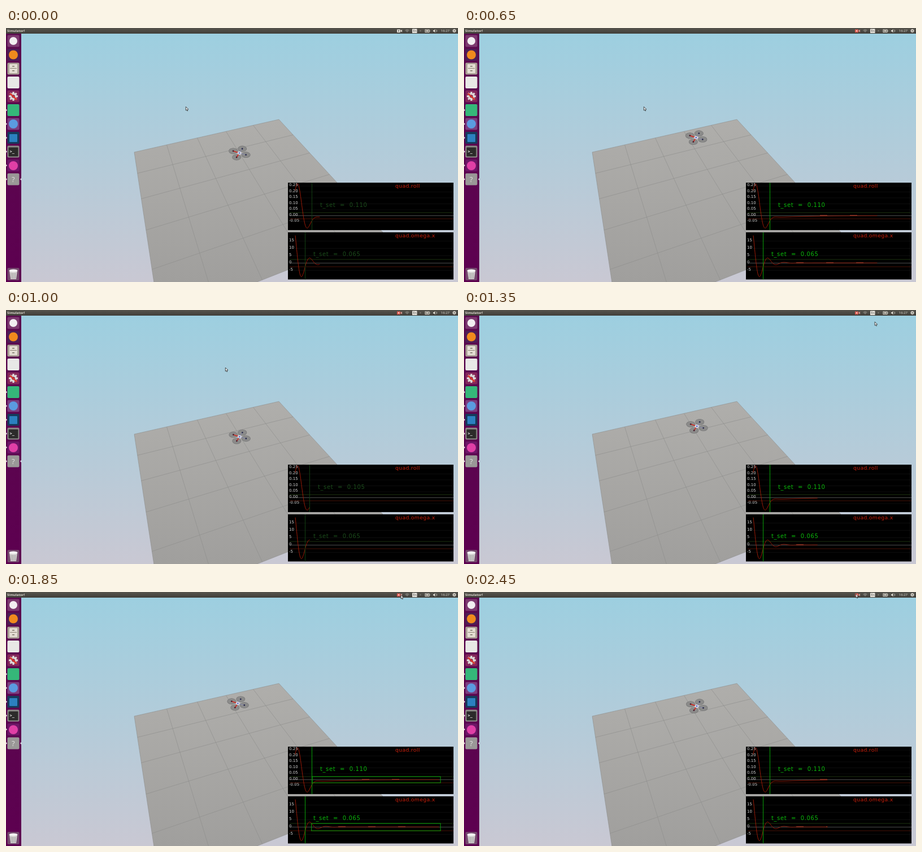
Animation of 800 by 450 pixels, one loop 2550 ms. Source, as an HTML page with a canvas:

```html
<!DOCTYPE html>
<html lang="en">
<head>
<meta charset="utf-8">
<title>Simulator</title>
<style>
html, body { margin: 0; width: 100%; height: 100%; overflow: hidden; }
canvas { display: block; width: 800px; height: 450px; }
</style>
</head>
<body>
<canvas id="stage" width="800" height="450"></canvas>
<script>
const ctx = document.getElementById('stage').getContext('2d');
const LOOP = 2550, STEPS = 38, STEP_MS = 66.8;
const START = 513, END = 769;

const plots = [
  { top: 274, bottom: 358, name: 'quad.roll', zero: 332.5, rowGap: 10.5, unit: 0.05, rows: 5, digits: 2,
    band: 5.5, settle: 0.11, lineX: 541.5, boxX: 542, textY: 317, dashX: 630,
    curve(x) {
      const s = x - 516;
      return 332.5 - 57 * Math.exp(-((s / 18) ** 2)) * Math.cos(0.15 * s) + Math.max(0, s) / 10 * Math.exp(1 - s / 30);
    } },
  { top: 362, bottom: 445.5, name: 'quad.omega.x', zero: 416.5, rowGap: 13, unit: 5, rows: 3, digits: 0,
    band: 6.5, settle: 0.065, lineX: 529.5, boxX: 540.5, textY: 404, dashX: 588,
    curve(x) {
      const s = x - 512;
      return 416.2 - 55 * Math.exp(-0.0706 * s) * Math.cos(0.217 * s + 0.486);
    } }
];

function rect(x, y, w, h, color) {
  ctx.fillStyle = color;
  ctx.fillRect(x, y, w, h);
}
function tile(x, y, w, h, color, r = 2) {
  ctx.fillStyle = color;
  ctx.beginPath();
  ctx.roundRect(x, y, w, h, r);
  ctx.fill();
}
function oval(x, y, rx, ry, color) {
  ctx.fillStyle = color;
  ctx.beginPath();
  ctx.ellipse(x, y, rx, ry, 0, 0, 7);
  ctx.fill();
}
function arc(x, y, r, middle, color) {
  ctx.strokeStyle = color;
  ctx.lineWidth = 0.8;
  ctx.beginPath();
  ctx.arc(x, y, r, middle - 0.8, middle + 0.8);
  ctx.stroke();
}
function trace(points, close) {
  ctx.beginPath();
  points.forEach(p => ctx.lineTo(p[0], p[1]));
  if (close) ctx.closePath();
}
function line(points, color, width = 1) {
  trace(points);
  ctx.strokeStyle = color;
  ctx.lineWidth = width;
  ctx.stroke();
}
function shape(points, color) {
  trace(points, true);
  ctx.fillStyle = color;
  ctx.fill();
}
function frame(x, y, w, h, color) {
  ctx.strokeStyle = color;
  ctx.lineWidth = 1;
  ctx.strokeRect(x, y, w, h);
}
function text(str, x, y, font, color, spacing = 0, wordGap = 0) {
  ctx.font = font;
  ctx.letterSpacing = spacing + 'px';
  ctx.wordSpacing = wordGap + 'px';
  ctx.fillStyle = color;
  ctx.fillText(str, x, y);
}
function fade(y0, y1, a, b) {
  const g = ctx.createLinearGradient(0, y0, 0, y1);
  g.addColorStop(0, a);
  g.addColorStop(1, b);
  return g;
}
const wide = px => `${px}px "DejaVu Sans", sans-serif`;
const sans = px => `${px}px "Open Sans", sans-serif`;

// Perspective map of the unit square onto the floor.
function floorPoint(u, v) {
  const w = 1 + 0.158 * u - 0.4255 * v;
  return [(227 + 332.3 * u - 70.7 * v) / w, (220 - 32.4 * u + 77.6 * v) / w];
}
function drawFloor() {
  shape([floorPoint(0, 0), floorPoint(1, 0), floorPoint(1, 1), floorPoint(0, 1)], fade(162, 450, '#afaeab', '#a09f9d'));
  for (let i = 0; i <= 1; i += 0.2) {
    line([floorPoint(i, 0), floorPoint(i, 1)], '#8b8b8a', 0.6);
    line([floorPoint(0, i), floorPoint(1, i)], '#8b8b8a', 0.6);
  }
}

function drawGear(x, y, r, color, hub) {
  for (let a = 0; a < Math.PI; a += Math.PI / 4) {
    const dx = r * Math.cos(a), dy = r * Math.sin(a);
    line([[x - dx, y - dy], [x + dx, y + dy]], color, r * 0.4);
  }
  oval(x, y, r * 0.75, r * 0.75, color);
  oval(x, y, r * 0.35, r * 0.35, hub);
}

function drawLauncher() {
  rect(0, 10, 27, 440, fade(10, 450, '#5a0a4e', '#5d0050'));
  const backs = ['#7d3a70', '#4d1f55', '#aaa196', '#e8e8e6', '#84275a', '#35b779', '#7a3f80', '#153b5c',
    '#8b8a86', '#6d1767', '#9a9897'];
  backs.forEach((color, i) => {
    const y = 23 + i * 24.5;
    tile(2.5, y - 10.5, 21, 21, color);
    if (i > 4) shape([[0, y - 2], [2, y], [0, y + 2]], '#eee');
  });
  shape([[27, 266], [25, 268], [27, 270]], '#eee');

  oval(13, 23, 7, 7, '#f2eef1');
  oval(13, 47.5, 8, 8, '#f08a1d');
  tile(6, 64, 14, 16, '#e4ded3', 1);
  rect(7, 71, 12, 1, '#8e8577');
  rect(11, 67, 4, 1.5, '#7c7468');
  rect(11, 75, 4, 1.5, '#7c7468');
  drawGear(13, 121, 8, '#dddad8', '#84275a');
  line([[7, 116], [19, 127]], '#d6382b', 3);
  oval(13, 170, 8, 8, '#5b9be0');
  tile(6, 188, 14, 14, '#2c80c0', 1);
  tile(4.5, 211.5, 17, 16, '#2c2b2a', 1);
  text('>_', 6.5, 221, 'bold 7px "DejaVu Sans Mono", monospace', '#f2f2f2');
  oval(13, 244, 8, 8, '#e03fa6');
  text('?', 10, 273, sans(13), '#e2e1e0');

  tile(2.5, 425, 21, 22, '#74486d');
  shape([[6, 430], [20, 430], [18, 445], [8, 445]], '#d3d1d0');
  oval(13, 430, 7.5, 2.5, '#f3f2f2');
  for (let x = 9; x < 19; x += 2.5) line([[x, 434], [x, 444]], '#8d898c', 0.7);
}

function drawTopBar(recording) {
  const pale = '#dfdbd2';
  rect(0, 0, 800, 10, fade(0, 10, '#56544d', '#413f3a'));
  text('Simulator!', 2, 7.2, 'bold ' + sans(6), pale);

  tile(692, 2.5, 6, 5.5, recording ? '#dc5a50' : pale, 0.5);
  shape([[698, 5], [701, 2.7], [701, 7.8]], recording ? '#d99a92' : pale);
  oval(695, 5.2, 1.1, 1.1, recording ? '#f4e4e0' : '#555');
  for (let r = 1.5; r < 6; r += 1.7) arc(710, 8, r, -Math.PI / 2, '#a9a69f');
  tile(719, 1.5, 8.5, 7.5, '#e9e6df', 0.5);
  text('En', 720.2, 7.3, sans(5.5), '#3c3b37');
  oval(733.5, 5, 1.3, 1.3, '#77746d');
  frame(742, 3, 7, 4.5, pale);
  rect(743.5, 4.2, 4, 2, pale);
  rect(749.5, 4.2, 1, 2, pale);
  shape([[756, 4], [757.5, 4], [759.5, 2], [759.5, 8.2], [757.5, 6.2], [756, 6.2]], pale);
  arc(759.5, 5.1, 3, 0, pale);
  text('16:27', 769.7, 7.4, sans(6), pale);
  drawGear(793.5, 5, 3.2, pale, '#4a4842');
}

// The drone climbs and slightly overshoots during each sweep.
function drawDrone(p) {
  const s = (p - START) / (END - START);
  const x = 413.7 - 3.4 * s, y = 211.5 + 17.5 * Math.cos(3.4 * s + 0.4);
  const rotors = [[-11, -3.6], [5, -7.5], [11.5, 3.2], [-5, 7.5]];
  for (const [dx, dy] of rotors) {
    oval(x + dx, y + dy, 8, 5.4, '#757575');
    oval(x + dx, y + dy, 7.3, 4.8, '#8b8b8a');
  }
  rotors.forEach(([dx, dy], i) => {
    const front = i % 3 === 0;
    line([[x, y], [x + dx, y + dy]], front ? '#d8281e' : '#8388ad', front ? 1.6 : 1);
    oval(x + dx, y + dy, 1.4, 1.4, front ? '#4a2030' : '#2b2d4d');
  });
  oval(x, y, 3.4, 2.8, '#d4d4e4');
  oval(x, y, 1.3, 1.1, '#4054c0');
}

function drawPlot(plot, p) {
  const { top, bottom, zero, band } = plot;
  const settled = p > 558, lit = '#08a008';
  const across = (y, color, width) => line([[502, y], [792, y]], color, width);
  rect(499, top, 293, bottom - top, '#000');

  for (let i = -1; i <= plot.rows; i++) {
    const y = zero - i * plot.rowGap;
    across(y, i ? '#131313' : '#4c4c4c', i ? 0.7 : 1);
    text((i * plot.unit).toFixed(plot.digits), 501, y + 0.4, wide(7), '#d4d4d4');
  }
  across(zero - band, '#1e3410');
  across(zero + band, '#481206');

  ctx.save();
  ctx.beginPath();
  ctx.rect(499, top, p - 499, bottom - top);
  ctx.clip();
  const curve = [];
  for (let x = 512; x <= END; x += 0.5) curve.push([x, plot.curve(x)]);
  line(curve, '#ae1f08', 0.9);
  ctx.setLineDash([13, 40]);
  line([[plot.dashX, zero - 0.5], [730, zero - 0.5]], '#b8442e', 1);
  ctx.restore();

  const x = Math.min(plot.lineX, Math.floor(p) + 0.5);
  const time = Math.min(plot.settle, Math.round((p - START) * 0.854) * 0.005);
  line([[x, top], [x, bottom]], settled ? lit : '#123f12');
  text('t_set = ' + time.toFixed(3), x + 14.5, plot.textY, wide(10), settled ? '#0bb80b' : '#1b4c1b', 0.6, 4);
  text(plot.name, 689, top + 9, wide(9.3), '#c81e0a', 0.3);
  if (p > END - 5) frame(plot.boxX, zero - band, END - plot.boxX, 2 * band, lit);
}

function drawPointer(t) {
  const path = [[900, 318, 139], [1000, 386, 102], [1350, 741, 17], [1850, 699, 5], [2150, 693, 3]];
  const next = Math.max(1, path.findIndex(key => key[0] > t));
  const [a, b] = t >= 2150 ? path.slice(-2) : [path[next - 1], path[next]];
  const f = Math.min(1, Math.max(0, (t - a[0]) / (b[0] - a[0])));
  ctx.save();
  ctx.translate(a[1] + (b[1] - a[1]) * f, a[2] + (b[2] - a[2]) * f);
  const arrow = [[0.3, 0.5], [0.3, 7], [1.7, 5.8], [2.8, 8], [3.8, 7.5], [2.9, 5.3], [4.8, 5]];
  shape(arrow, '#f4f4f4');
  trace(arrow, true);
  ctx.strokeStyle = '#222';
  ctx.lineWidth = 0.8;
  ctx.stroke();
  ctx.restore();
}

// Pictures change on a 50 ms raster, so each one stays for 50 or 100 ms.
function stepAt(t) {
  let k = STEPS - 1;
  while (50 * Math.round(k * STEP_MS / 50) > t) k--;
  return k;
}

function draw() {
  const step = stepAt(performance.now() % LOOP);
  const p = Math.min(END, START + 17.6 * ((step + 2.4) % 16));
  rect(0, 0, 800, 450, fade(10, 450, '#9dcfe0', '#c9c8d3'));
  drawFloor();
  drawDrone(p);
  plots.forEach(plot => drawPlot(plot, p));
  drawLauncher();
  drawTopBar(step > 0);
  drawPointer(step * STEP_MS);
  requestAnimationFrame(draw);
}
draw();
</script>
</body>
</html>
```
